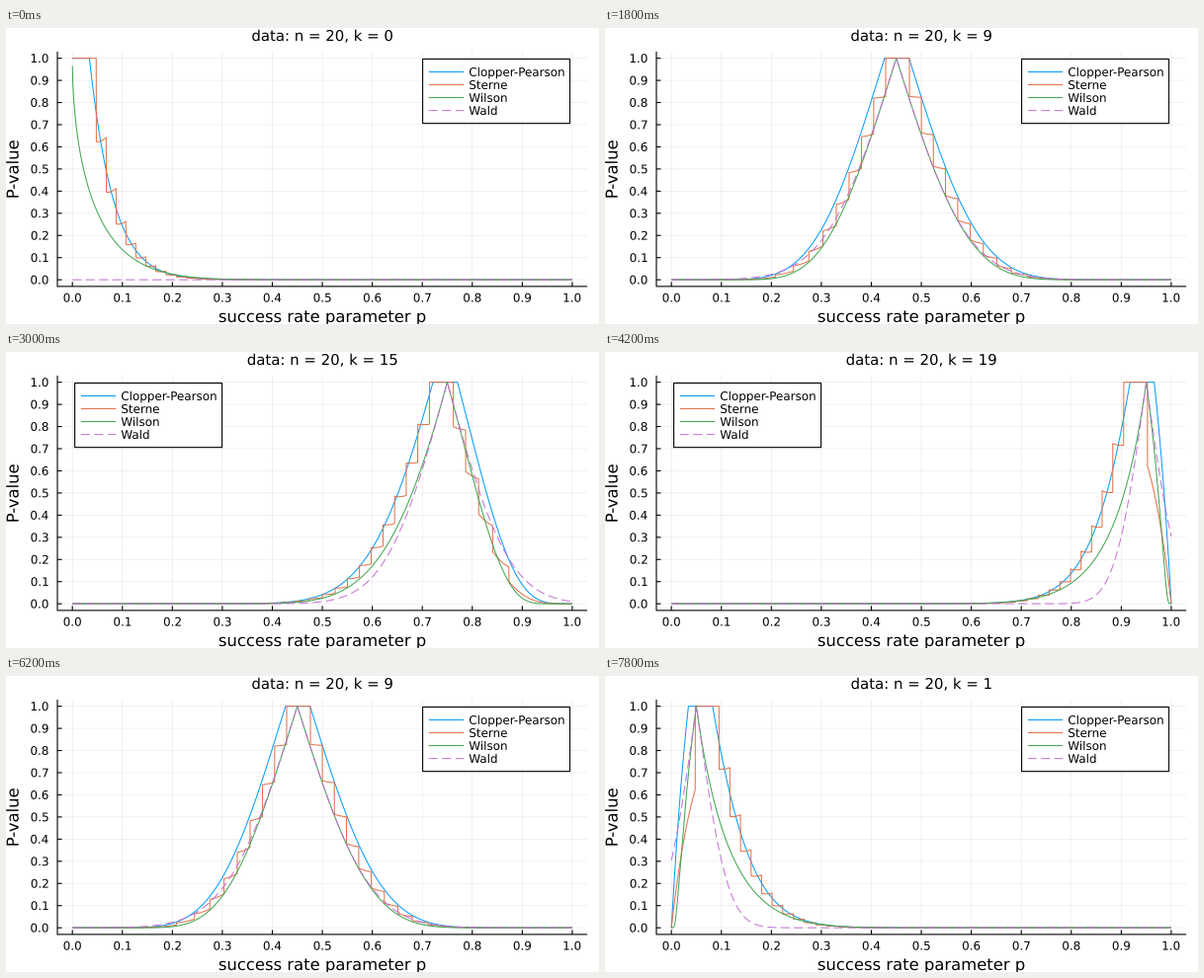
Recreate the animation shown at these times as a matplotlib script. Size 600 by 300 pixels, loop 8000 ms.

```python
import math

import matplotlib.pyplot as plt
import numpy as np
from matplotlib.animation import FuncAnimation
from matplotlib.patches import PathPatch, Rectangle
from matplotlib.textpath import TextPath
from matplotlib.transforms import Affine2D

W, H, DPI = 600, 300, 100
PX = 72 / DPI
N = 20
SMALL, TITLE, LABEL = 11.94, 14.93, 16.42  # font sizes in pixels
CAP = 0.729  # cap height of the font
LEFT, RIGHT, TOP, BOTTOM = 52, 588.1, 23.9, 261.9
MID_X, MID_Y = (LEFT + RIGHT) / 2, (TOP + BOTTOM) / 2
DASH = (0, (9, 4.5))
STYLES = [
    ("Clopper-Pearson", "#009AFA", "-"),
    ("Sterne", "#E36F47", "-"),
    ("Wilson", "#3EA44E", "-"),
    ("Wald", "#C371D2", DASH),
]

plt.rcParams["font.family"] = "DejaVu Sans"

# P-value functions of the binomial model
p = np.linspace(0, 1, 10001)
pmf = np.stack([math.comb(N, j) * p**j * (1 - p)**(N - j)
                for j in range(N + 1)])
erfc = np.vectorize(math.erfc, otypes=[float])


def clopper_pearson(k):
    lower, upper = pmf[:k + 1].sum(axis=0), pmf[k:].sum(axis=0)
    return np.minimum(1, 2 * np.minimum(lower, upper))


def sterne(k):
    return np.where(pmf <= pmf[k] * (1 + 1e-7), pmf, 0).sum(axis=0)


def normal_pvalue(k, variance):
    with np.errstate(divide="ignore", invalid="ignore"):
        z = np.abs(k - N * p) / np.sqrt(variance)
    return erfc(z / math.sqrt(2))


def wilson(k):
    return normal_pvalue(k, N * p * (1 - p))


def wald(k):
    return normal_pvalue(k, k * (1 - k / N))


METHODS = [clopper_pearson, sterne, wilson, wald]

# One stage in pixel coordinates, y pointing down
fig = plt.figure(figsize=(W / DPI, H / DPI), dpi=DPI, facecolor="white")
stage = fig.add_axes([0, 0, 1, 1])
stage.set(xlim=(0, W), ylim=(H, 0))
stage.axis("off")


def to_x(u):
    return LEFT + (u + 0.03) * (RIGHT - LEFT) / 1.06


def to_y(v):
    return BOTTOM - (v + 0.03) * (BOTTOM - TOP) / 1.06


def line(xs, ys, color="black", width=1.0, **kw):
    return stage.plot(xs, ys, color=color, lw=width * PX, snap=False,
                      solid_capstyle="butt", dash_capstyle="butt", **kw)[0]


def text_path(x, y, s, size, align=0.5, angle=0):
    """Text outline; align 0 starts at x, 0.5 centres and 1 ends there."""
    path = TextPath((0, 0), s, size=size)
    box = path.get_extents()
    dx = box.x0 + align * box.width if align else 0
    return path.transformed(Affine2D().translate(-dx, 0).scale(1, -1)
                            .rotate_deg(-angle).translate(x, y))


def label(*args, transform=stage.transData, **kw):
    patch = PathPatch(text_path(*args, **kw), fc="black", lw=0, snap=False,
                      transform=transform)
    return stage.add_patch(patch)


# Grid, axes and labels
for i in range(11):
    x, y = to_x(i / 10), to_y(i / 10)
    line([x, x], [TOP, BOTTOM], width=0.55, alpha=0.1, zorder=1)
    line([LEFT, RIGHT], [y, y], width=0.55, alpha=0.1, zorder=1)
    line([x, x], [BOTTOM, BOTTOM - 4.5], width=1.1)
    line([LEFT, LEFT + 4.5], [y, y], width=1.1)
    label(x, 277.6, f"{i / 10:.1f}", SMALL)
    label(42.6, y + SMALL * CAP / 2, f"{i / 10:.1f}", SMALL, align=1)
line([LEFT, LEFT, RIGHT], [TOP, BOTTOM, BOTTOM], width=1.1)
label(MID_X, 298, "success rate parameter p", LABEL)
label(12.6, MID_Y, "P-value", LABEL, angle=90)
title = label(MID_X, 13, " ", TITLE, align=0)

curves = [line([], [], color, ls=ls, zorder=3) for _, color, ls in STYLES]

# Legend, shifted as one group
shift = Affine2D()
legend_tf = shift + stage.transData
BOX_X, BOX_Y, BOX_W, BOX_H = 69.6, 31.45, 149, 65.2
stage.add_patch(Rectangle((BOX_X, BOX_Y), BOX_W, BOX_H, fc="white",
                          ec="black", lw=1.1 * PX, snap=False,
                          transform=legend_tf))
for i, (name, color, ls) in enumerate(STYLES, 1):
    y = BOX_Y + BOX_H * i / (len(STYLES) + 1)
    line([75.8, 111.2], [y, y], color, ls=ls, transform=legend_tf)
    label(116.3, y + SMALL * CAP / 2, name, SMALL, align=0,
          transform=legend_tf)


def draw(frame):
    k = N - abs(N - frame)
    title.set_path(text_path(MID_X, 13, f"data: n = {N}, k = {k}", TITLE))
    for curve, method in zip(curves, METHODS):
        curve.set_data(to_x(p), to_y(method(k)))
    shift.clear().translate(352 if k <= N / 2 else 0, 0)
    return [title, *curves]


anim = FuncAnimation(fig, draw, frames=2 * N, init_func=lambda: draw(0),
                     interval=200, repeat=True, repeat_delay=0, blit=False)
plt.show()
```
